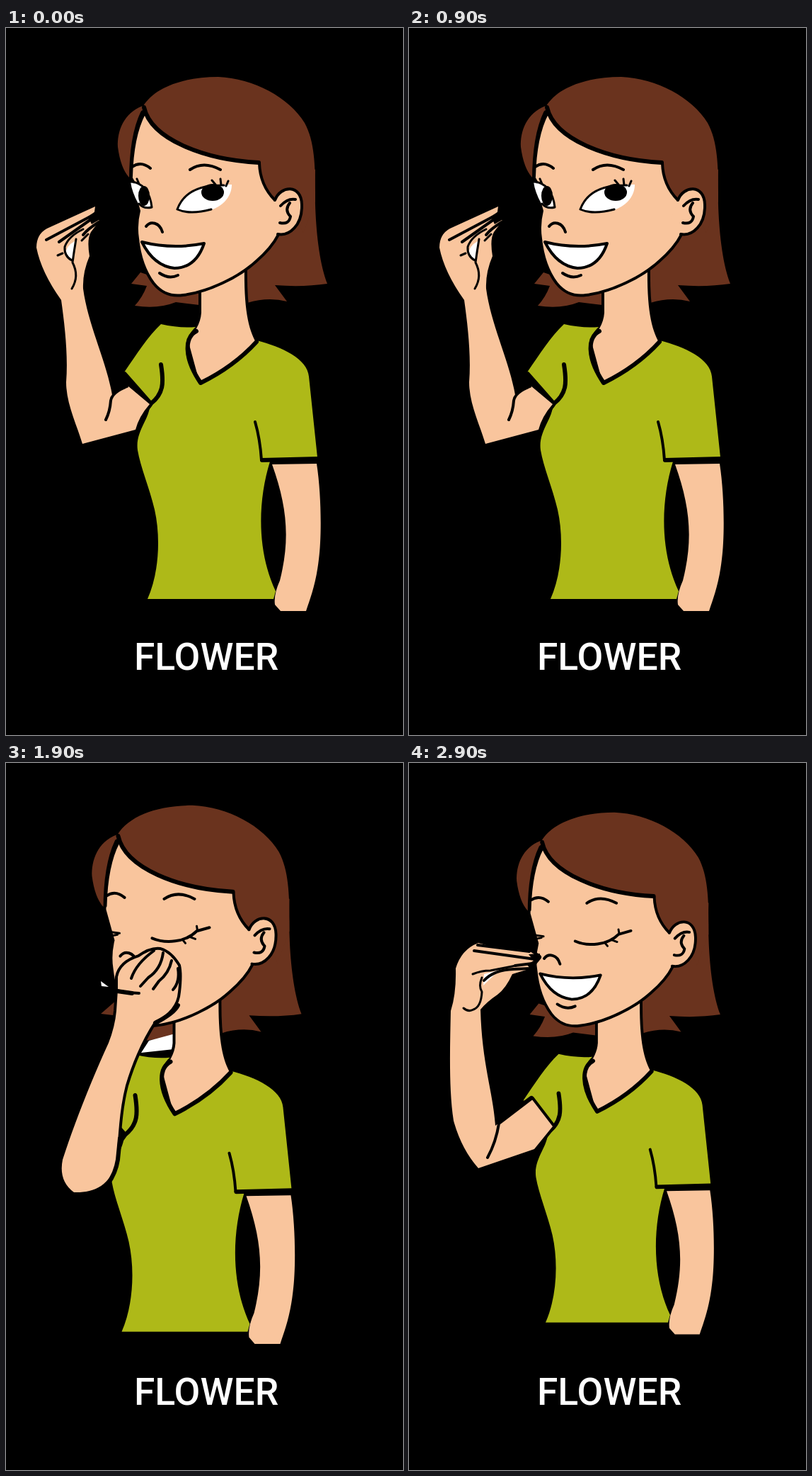
Write an HTML page without scripts that moves like this. It is 561 px wide and 998 px high and loops after 3 s.

```html
<!DOCTYPE html>
<html lang="en">
<head>
<meta charset="utf-8">
<title>Flower sign</title>
<style>
  html, body { margin: 0; height: 100%; overflow: hidden; background: #000; }
  svg { display: block; width: 100vw; height: 100vh; }
  .hair { fill: #6a331e; }
  .shirt { fill: #aeb918; }
  .skin { fill: #f9c59d; stroke: #000; stroke-width: 8; paint-order: stroke; stroke-linejoin: round; }
  .flat { stroke: none; }
  .white { fill: #fff; }
  .line { fill: none; stroke: #000; stroke-width: 4; stroke-linecap: round; stroke-linejoin: round; }
  .thin { stroke-width: 3; }
  .bold { stroke-width: 6; }
  .teeth { fill: #fff; }
  .label { font: 500 53.4px Roboto, sans-serif; fill: #fff; }
  .pose { visibility: hidden; animation: show 3s step-end infinite; }
  .mouth { animation-delay: -2s; }
  .nose { animation-delay: -1s; }
  @keyframes show {
    0% { visibility: visible; }
    33.333%, 100% { visibility: hidden; }
  }
</style>
</head>
<body>
<svg viewBox="0 0 561 998">
  <defs>
    <g id="figure">
      <!-- back hair and neck -->
      <path class="hair" d="M300 110L437 200C435 260 440 325 454 361Q420 366 380 363L397 386Q370 379 341 388L320 340Z"/>
      <path class="skin" d="M276 360V402C275 418 266 430 257 440L275 506L354 445C342 425 336 395 337 335Z"/>

      <!-- shirt and resting arm -->
      <path class="skin" d="M376 616L439 615C446 660 446 720 442 750C438 785 430 805 424 823H388L380 814Q378 800 387 780C402 720 397 675 376 616Z"/>
      <path class="shirt" d="M219 418Q245 424 268 422C252 436 248 464 275 502Q322 478 354 441C390 450 426 467 428 492L440 606L373 612C355 670 355 740 381 795L378 806H200C216 770 219 720 210 680C203 650 190 620 186 596C182 568 206 550 203 528L167 486C185 460 200 436 219 418Z"/>
      <path class="line bold" d="M269 428C253 436 250 464 275 501Q322 478 354 443M362 610L441 608M219 475C223 500 223 516 205 530Q189 550 185 569"/>
      <path class="line" d="M205 529L168 487M352 556Q359 580 361 610"/>

      <!-- face -->
      <path class="hair" d="M193 110C166 120 157 146 158 168Q162 198 174 211L184 190Q188 150 197 125Z"/>
      <path class="skin" d="M194 120C182 145 178 180 178 215L190 258Q185 278 188 297Q192 335 210 359C222 374 236 377 250 375C285 371 328 350 352 328Q374 309 383 291L400 210L340 150Z"/>
      <path class="hair" d="M194 110C210 84 250 69 300 69C350 71 400 98 422 134C438 163 437 205 437 245L420 290Q395 225 380 243Q360 222 358 191C280 187 204 157 194 110Z"/>
      <path class="line" d="M358 191Q359 222 380 243M195 121C184 142 178 170 177 210"/>
      <path class="line bold" d="M195 112C205 157 280 186 357 190"/>
      <path class="skin flat" d="M380 243C388 223 416 220 417 249C418 278 400 293 384 290L370 270Z"/>
      <path class="line" d="M380 243C388 222 417 220 418 249C419 279 400 294 384 291M388 251Q398 240 409 242M401 247Q393 257 402 266Q400 278 387 275"/>
      <path class="line" d="M178 196Q191 187 204 198M260 200Q279 187 303 200M198 280C204 272 217 274 221 288"/>
    </g>

    <path id="flip" class="hair" d="M190 345L177 361L199 364Q193 380 182 392Q215 397 240 387L273 391L277 365Q230 385 205 350Z"/>

    <g id="smile">
      <path class="line teeth" d="M192 302Q235 313 280 304Q268 339 238 339Q209 336 192 302Z"/>
      <path class="line" d="M217 346Q230 355 243 349"/>
    </g>

    <g id="closed">
      <path class="line" d="M243 255C262 263 290 261 306 245L324 240"/>
      <path class="line thin" d="M307 244L306 238M296 253L304 256M286 257L290 262M182 246L197 248M184 252L194 250"/>
    </g>
  </defs>

  <g class="pose">
    <use href="#flip"/>
    <use href="#figure"/>
    <use href="#smile"/>
    <path class="white" d="M176 217C193 217 205 232 206 254Q194 258 187 248Q178 232 176 217Z"/>
    <ellipse cx="195" cy="237" rx="8" ry="14"/>
    <path class="line thin" d="M176 217C192 217 204 232 206 253Q195 256 188 248M181 218L177 211M188 220L185 213"/>
    <path class="white" d="M242 256C250 234 270 221 319 221C319 243 298 260 270 260Q252 261 242 256Z"/>
    <ellipse cx="292" cy="232" rx="16" ry="12"/>
    <path class="line thin" d="M290 256Q260 264 242 256C250 234 270 221 308 222M296 221L291 215M304 222L303 213M311 223L314 216"/>

    <path class="skin" d="M126 252L58 283Q43 291 43 310Q50 345 78 384C83 420 88 462 85 500C85 530 100 560 108 587L183 567Q188 548 203 531L172 505L150 518C142 470 116 420 109 368Q108 345 118 322Q114 298 120 288L132 272L124 267Z"/>
    <path class="white" d="M97 301Q84 308 84 320L93 327Q98 315 97 301Z"/>
    <path class="line" d="M171 506Q150 514 148 526Q147 541 141 553M125 263L57 299M123 268L75 302M131 274Q115 284 109 292"/>
    <path class="line thin" d="M109 284Q88 294 83 309Q82 322 93 328M99 298Q96 316 94 331Q104 350 93 368M80 318L73 321M116 291L107 300"/>
    <path d="M116 266L129 257L133 270L121 277Z"/>
  </g>

  <g class="pose mouth">
    <path class="hair" d="M157 334L134 354L160 357ZM190 365H242V386L196 392Z"/>
    <path class="white" d="M202 392L239 382L237 404L191 409Z"/>
    <g transform="translate(-36.5 -9.7) scale(1 1.008)">
      <use href="#figure"/>
      <use href="#closed"/>
    </g>
    <path class="skin" d="M158 320L156 350Q154 372 145 395C122 445 96 510 80 560Q74 590 96 606C122 607 148 598 156 562C159 525 160 490 169 455C178 425 190 395 210 364Q241 350 243 323Q246 298 243 286Q232 268 218 264Q205 262 188 274Q162 282 158 302Z"/>
    <path class="line" d="M209 265Q184 283 177 304M222 268Q219 291 201 303L190 315M234 279Q230 297 216 308L208 319M243 290Q246 309 236 320M188 325Q165 324 148 319"/>
    <path class="line bold" d="M243 342Q238 353 211 367M161 530L158 560Q155 579 144 594M178 325L150 321"/>
    <path class="white" d="M134 308L145 316L135 315Z"/>
  </g>

  <g class="pose nose">
    <g transform="translate(-1.4 2.4) scale(.972 .977)">
      <use href="#flip"/>
      <use href="#figure"/>
      <use href="#smile"/>
      <use href="#closed"/>
    </g>
    <path class="skin" d="M98 254L120 260L171 266L183 274L169 291L146 298Q137 318 125 327Q110 337 101 348C103 425 119 465 122 512L173 474L203 513L177 545L98 572Q74 545 63 505C56 460 58 400 59 350Q67 325 66 290Q74 263 98 254Z"/>
    <path class="white" d="M106 298L128 292L105 314Z"/>
    <path class="line" d="M173 474L127 509Q123 535 111 557M92 265L178 277M97 257L170 266M172 290L148 291Q120 292 106 307M174 283L150 286"/>
    <path class="line thin" d="M90 298Q102 293 115 293L151 286M103 303Q98 315 103 323Q102 344 91 348Q84 352 77 346"/>
    <path d="M169 270L185 269L184 278L172 291L167 285L176 279Z"/>
  </g>

  <text class="label" x="181" y="905.5">FLOWER</text>
</svg>
</body>
</html>
```
